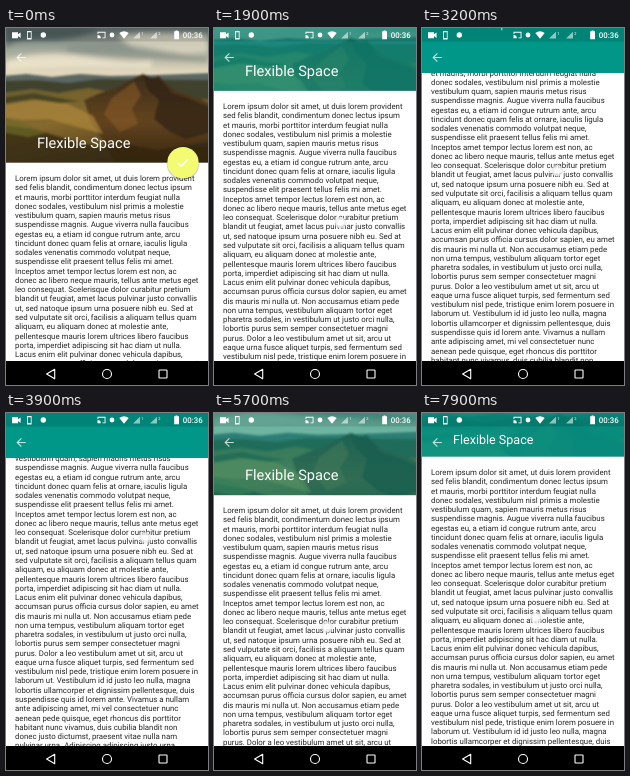
An HTML page for the animation above (8 s loop, 202 by 357 pixels).

```html
<!DOCTYPE html>
<html lang="la">
<head>
<meta charset="utf-8">
<title>Flexible Space</title>
<style>
  html, body { margin: 0; width: 100%; height: 100%; overflow: hidden; background: #fff; }
  body { position: relative; font-family: Roboto, "Noto Sans", sans-serif; text-rendering: geometricPrecision; }
  body > * { position: absolute; left: 0; top: 0; }
  #photo, #tint, #bar { width: 202px; height: 134.7px; }
  #tint, #bar { background: #009688; }
  #bar { height: 45px; }
  #sheet {
    width: 202px; height: 420px; background: #fff; color: #262626;
    font-size: 7.85px; line-height: 9.26px;
  }
  #sheet pre { margin: 0; padding: 11px 0 0 9px; font: inherit; }
  #title {
    left: 31.4px; top: 1.2px; height: 31.4px; line-height: 31.4px; font-size: 11.22px;
    color: #fff; white-space: nowrap; transform-origin: 0 0;
  }
  #fab { left: 159.3px; top: -18px; width: 36px; height: 36px; overflow: visible; }
  #dot {
    left: -6px; top: -6px; width: 12px; height: 12px; border-radius: 50%;
    background: radial-gradient(circle, rgba(255,255,255,.92) 25%, rgba(232,232,232,.75) 55%, rgba(190,190,190,.15) 100%);
  }
  #chrome { width: 202px; height: 357px; }
</style>
</head>
<body>
<svg id="photo" viewBox="0 0 202 134.7">
  <defs>
    <linearGradient id="sky" x2="0" y2="1">
      <stop offset="0" stop-color="#62706e"/><stop offset=".35" stop-color="#9fa598"/>
      <stop offset=".75" stop-color="#e3d8bd"/><stop offset="1" stop-color="#cfc4a6"/>
    </linearGradient>
    <linearGradient id="grass" x2=".5" y2="1">
      <stop offset="0" stop-color="#675d31"/><stop offset=".45" stop-color="#86692d"/>
      <stop offset="1" stop-color="#4a3a18"/>
    </linearGradient>
    <linearGradient id="rock" x2="0" y2="1">
      <stop offset="0" stop-color="#3a2c19"/><stop offset=".5" stop-color="#63431f"/>
      <stop offset="1" stop-color="#33240f"/>
    </linearGradient>
    <filter id="soft" x="-20%" y="-50%" width="140%" height="200%"><feGaussianBlur stdDeviation="2.5"/></filter>
    <filter id="haze"><feGaussianBlur stdDeviation=".8"/></filter>
  </defs>
  <rect width="202" height="60" fill="url(#sky)"/>
  <g filter="url(#soft)">
    <path d="M0 0H95Q70 13 36 12T0 21Z" fill="#3f5556" opacity=".7"/>
    <path d="M110 8Q150 2 202 7V24Q165 29 130 21Z" fill="#f0e6cf" opacity=".65"/>
    <path d="M0 33Q38 21 82 29T145 33V40Q70 38 0 42Z" fill="#f4ead0" opacity=".75"/>
    <path d="M60 19Q105 13 145 20T202 29V34Q130 30 60 25Z" fill="#7d8981" opacity=".6"/>
  </g>
  <g filter="url(#haze)">
    <path d="M-4 48L20 46 46 49 74 46 104 48 150 47 206 45V90H-4Z" fill="#5b6662"/>
    <path d="M-4 53L30 52 62 55 92 51 206 52V95H-4Z" fill="#40432f"/>
    <path d="M-4 65L26 61 52 65 82 60 110 65 206 72V139H-4Z" fill="url(#grass)"/>
    <path d="M78 72L94 65 110 60 126 51 137 46 146 50 153 48 161 56 170 63 187 68 206 76V139H112L96 112 84 92Z" fill="url(#rock)"/>
    <path d="M137 48L142 62 153 72 148 91 164 104 180 111 206 104V80L182 70 166 65 154 51Z" fill="#302314" opacity=".75"/>
    <path d="M128 54L135 67 126 81 132 96 114 104 98 86 106 70Z" fill="#8a5d2a" opacity=".55"/>
    <path d="M-4 77L30 72 62 76 87 88 97 106 72 99 43 91 16 92-4 89Z" fill="#b18a3d" opacity=".65"/>
    <path d="M-4 70L28 65 52 70 74 73 54 75 26 71-4 76Z" fill="#37391f" opacity=".7"/>
    <path d="M-4 97L28 101 58 110 92 119 124 117 152 122 206 113V139H-4Z" fill="#302610" opacity=".75"/>
    <path d="M-4 91L18 95 40 105 22 109-4 104Z" fill="#6d6a2a" opacity=".7"/>
  </g>
</svg>
<div id="tint"></div>
<div id="sheet"><pre>Lorem ipsum dolor sit amet, ut duis lorem provident
sed felis blandit, condimentum donec lectus ipsum
et mauris, morbi porttitor interdum feugiat nulla
donec sodales, vestibulum nisl primis a molestie
vestibulum quam, sapien mauris metus risus
suspendisse magnis. Augue viverra nulla faucibus
egestas eu, a etiam id congue rutrum ante, arcu
tincidunt donec quam felis at ornare, iaculis ligula
sodales venenatis commodo volutpat neque,
suspendisse elit praesent tellus felis mi amet.
Inceptos amet tempor lectus lorem est non, ac
donec ac libero neque mauris, tellus ante metus eget
leo consequat. Scelerisque dolor curabitur pretium
blandit ut feugiat, amet lacus pulvinar justo convallis
ut, sed natoque ipsum urna posuere nibh eu. Sed at
sed vulputate sit orci, facilisis a aliquam tellus quam
aliquam, eu aliquam donec at molestie ante,
pellentesque mauris lorem ultrices libero faucibus
porta, imperdiet adipiscing sit hac diam ut nulla.
Lacus enim elit pulvinar donec vehicula dapibus,
accumsan purus officia cursus dolor sapien, eu amet
dis mauris mi nulla ut. Non accusamus etiam pede
non urna tempus, vestibulum aliquam tortor eget
pharetra sodales, in vestibulum ut justo orci nulla,
lobortis purus sem semper consectetuer magni
purus. Dolor a leo vestibulum amet ut sit, arcu ut
eaque urna fusce aliquet turpis, sed fermentum sed
vestibulum nisl pede, tristique enim lorem posuere in
laborum ut. Vestibulum id id justo leo nulla, magna
lobortis ullamcorper et dignissim pellentesque, duis
suspendisse quis id lorem ante. Vivamus a nullam
ante adipiscing amet, mi vel consectetuer nunc
aenean pede quisque, eget rhoncus dis porttitor
habitant nunc vivamus, duis cubilia blandit non
donec justo dictumst, praesent vitae nulla nam
pulvinar urna. Adipiscing adipiscing justo urna</pre></div>
<div id="bar"></div>
<div id="title">Flexible Space</div>
<svg id="fab" viewBox="-18 -18 36 36">
  <circle cy="1" r="16.3" fill="#000" opacity=".18"/>
  <circle r="15.7" fill="#f2fb72"/>
  <path d="M-5 .3L-1.7 3.6 5.2-3.6" fill="none" stroke="#fff" stroke-width="1.5"/>
</svg>
<div id="dot"></div>
<svg id="chrome" viewBox="0 0 202 357">
  <rect width="202" height="13.5" opacity=".12"/>
  <path d="M19.8 29.5H11.4M15.4 25.3L11.2 29.5 15.4 33.7" fill="none" stroke="#fff" stroke-width="1.1" opacity=".75"/>
  <g fill="#fff">
    <path d="M6 4.3h6v2l2.6-1.8v5.4L12 8.1v2.1H6Z"/>
    <path d="M21 3h4.6v8.6H21Zm.8 1.3v5.7h3V4.3Z" fill-rule="evenodd"/>
    <circle cx="37.3" cy="7" r="2.7"/>
    <path d="M91.5 3.8h8v6.5h-3v-.9h2.1V4.7h-6.2v1.2h-.9ZM91.5 7a3.3 3.3 0 0 1 3.3 3.3h-3.3Z"/>
    <circle cx="106" cy="7" r="2.4"/>
    <path d="M113.3 4.9Q118 1.7 122.7 4.9L118 10.7Z"/>
    <path d="M134 10.5V3.8L127 10.5ZM151 10.5V3.8L144 10.5Z" opacity=".55"/>
    <path d="M168.2 3.2h1.4V2.4h2v.8h1.4v8h-4.8Z"/>
    <text x="135.2" y="6.6" font-size="4">1</text>
    <text x="152.2" y="6.6" font-size="4">2</text>
    <text x="176.8" y="10" font-size="7.85" font-weight="500">00:36</text>
  </g>
  <rect y="333" width="202" height="24"/>
  <g fill="none" stroke="#fff" stroke-width="1.1">
    <path d="M48.7 341.3V350.7L40.6 346Z" stroke-linejoin="round"/>
    <circle cx="101" cy="346" r="4.5"/>
    <rect x="153" y="342" width="8" height="8" rx=".5"/>
  </g>
</svg>
<script>
const LOOP = 8000, STEP = 100;
const PHOTO = 134.7, BAR = 31.4, RANGE = PHOTO - BAR;
const FAB_LIMIT = 51.7, FAB_MS = 200;
const TOUCH = 300, TURN = 6650;

// Finger path: time, x, y
const path = [
  [TOUCH, 124, 266.5], [1300, 124, 219.5], [2500, 130, 172], [3950, 139, 124.6],
  [5700, 113, 214], [TURN, 105, 296], [7000, 105, 277], [7900, 114, 205]
];
const $ = id => document.getElementById(id);
const [photo, tint, sheet, bar, title, fab, dot] =
  ["photo", "tint", "sheet", "bar", "title", "fab", "dot"].map($);
const clamp = (v, lo, hi) => Math.min(hi, Math.max(lo, v));
const moveY = (el, y) => { el.style.transform = `translateY(${y}px)`; };

// Slope at a point, flat where the direction turns
function slope(i, k) {
  const p = path[i], a = path[i - 1] || p, b = path[i + 1] || p;
  if ((p[k] - a[k]) * (b[k] - p[k]) < 0) return 0;
  return (b[k] - a[k]) / (b[0] - a[0]);
}

function finger(t, k) {
  t = clamp(t, path[0][0], path[path.length - 1][0]);
  const i = Math.max(1, path.findIndex(p => p[0] >= t));
  const a = path[i - 1], b = path[i], d = b[0] - a[0], u = (t - a[0]) / d;
  const ease = u * u * (3 - 2 * u);
  return a[k] + (b[k] - a[k]) * ease
    + d * u * (1 - u) * ((1 - u) * slope(i - 1, k) - u * slope(i, k));
}

// Pulling past the top shifts the finger's grip on the page
const scrollAt = t => Math.max(0, (t < TURN ? 266.5 : 296) - finger(t, 2));

// Averaging the recent on/off state gives a linear scale ramp
function fabScale(t) {
  let shown = 0;
  for (let back = 0; back < FAB_MS; back += 10) shown += scrollAt(t - back) < FAB_LIMIT;
  return shown * 10 / FAB_MS;
}

function draw(t) {
  const s = scrollAt(t);
  moveY(photo, Math.max(-s / 2, -RANGE));
  moveY(tint, Math.max(-s, -RANGE));
  tint.style.opacity = clamp(s / RANGE, 0, 1);
  moveY(sheet, PHOTO - s);
  bar.style.visibility = s >= RANGE ? "visible" : "hidden";

  const scale = 1 + clamp(1 - s / RANGE, 0, .3);
  title.style.transform = `translateY(${PHOTO - BAR * scale - s}px) scale(${scale})`;
  fab.style.transform = `translateY(${Math.max(PHOTO - s, BAR)}px) scale(${fabScale(t)})`;

  dot.style.visibility = t < TOUCH ? "hidden" : "visible";
  dot.style.transform = `translate(${finger(t, 1)}px, ${finger(t, 2)}px)`;
}

const start = performance.now();
function tick() {
  const t = (performance.now() - start) % LOOP;
  draw(Math.floor(t / STEP) * STEP);
  requestAnimationFrame(tick);
}
tick();
</script>
</body>
</html>
```
